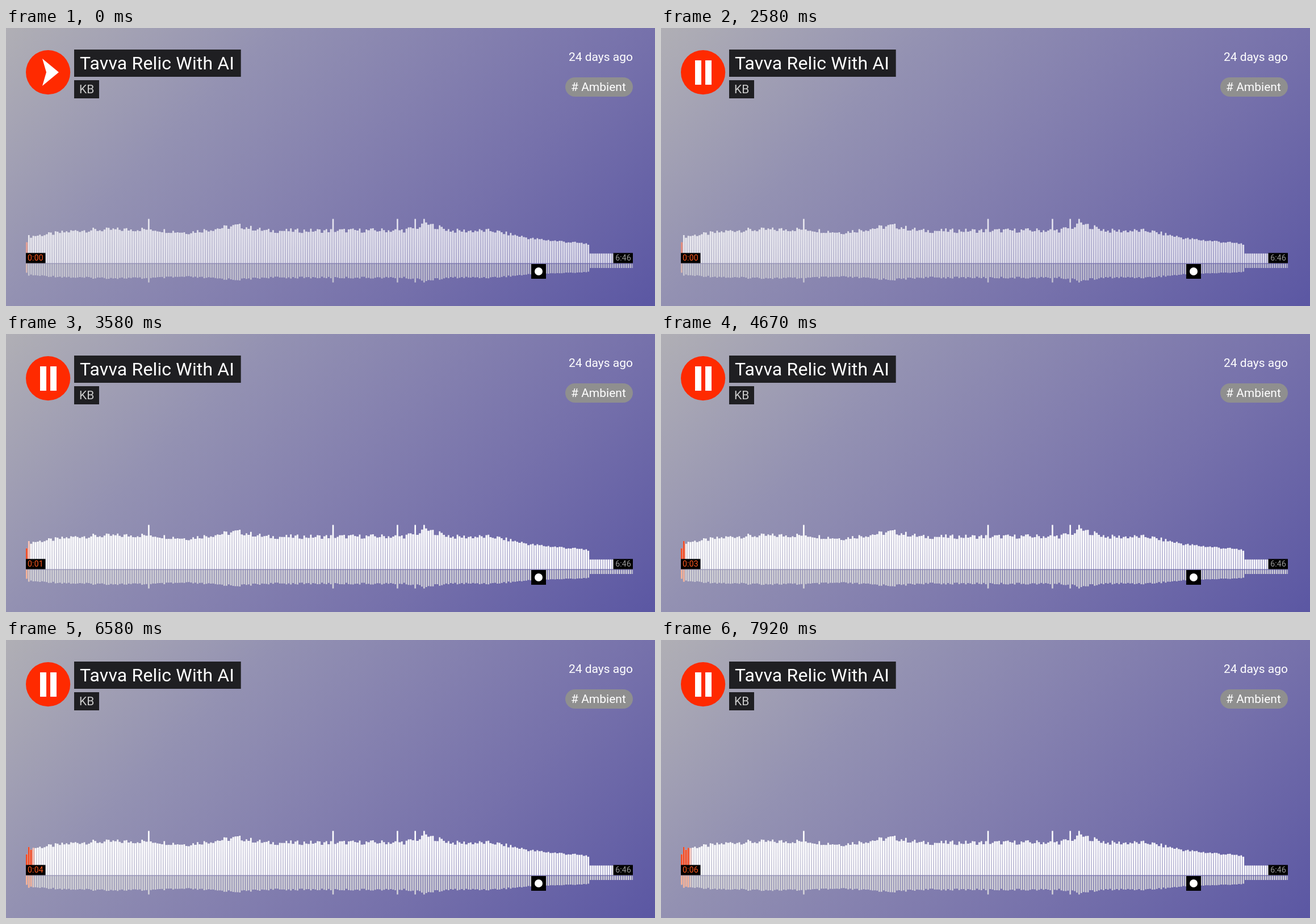
Animation of 1143 by 490 pixels, one loop 8000 ms. Source, as an HTML page:

```html
<!DOCTYPE html>
<html lang="en">
<head>
<meta charset="utf-8">
<title>Audio player</title>
<style>
html, body { margin: 0; width: 100%; height: 100%; overflow: hidden; }
body { background: linear-gradient(135deg, #b0afb5, #9391b2 30%, #8581af 50%, #7671ab 70%, #5b57a3); }
svg { display: block; font-family: Roboto, Inter, sans-serif; fill: #fff; }
.end { text-anchor: end; }
.small { font-size: 14px; letter-spacing: .2px; }
</style>
</head>
<body>
<svg width="1143" height="490" viewBox="0 0 1143 490">
  <defs>
    <linearGradient id="fade" gradientUnits="userSpaceOnUse" x1="0" y1="345" x2="0" y2="414">
      <stop stop-color="#fff" stop-opacity=".7"/>
      <stop offset="1" stop-color="#fff" stop-opacity=".4"/>
    </linearGradient>
  </defs>

  <circle cx="74.1" cy="78.1" r="39.1" fill="#ff2a00"/>
  <path id="icon"/>

  <path d="M120 38h293.7v48H120z" fill="#1f1f22"/>
  <text x="130" y="73" font-size="32" letter-spacing=".15">Tavva Relic With AI</text>
  <path d="M120 92h44v32h-44z" fill="#1f1f22"/>
  <text x="129" y="115" font-size="21" fill="#ccc">KB</text>

  <text class="end" x="1104" y="58" font-size="21">24 days ago</text>
  <rect x="985" y="87" width="119" height="34" rx="17" fill="#8f8f8f"/>
  <text x="995" y="111" font-size="21">#&#160;Ambient</text>

  <g id="wave">
    <path id="gaps" fill="url(#fade)"/>
    <path id="upper"/>
    <path id="lower" fill="#dcdcdc" opacity=".9"/>
    <g id="played"></g>
  </g>

  <path d="M35 396.5h34.5v18H35zM1069.5 396.5h34.5v18h-34.5z" fill="#000"/>
  <text id="clock" class="small" x="38" y="410" fill="#ff5a1f"></text>
  <text class="small end" x="1101" y="410" fill="#999">6:46</text>

  <path d="M925 416h26v26h-26z" fill="#000"/>
  <circle cx="938" cy="429" r="7"/>
</svg>
<script>
const LOOP = 8000, TRACK = 406, BARS = 274;
const LEFT = 35, RIGHT = 1104, BASE = 414.5, MIRROR = 415.8;
const UNIT = (RIGHT - LEFT) / 820, PITCH = 3 * UNIT, WIDTH = 2 * UNIT;
const PLAY = 'M64 54L93 78L64 102L71 78z';
const PAUSE = 'M60 57h11v43H60zM78 57h11v43H78z';
const $ = id => document.getElementById(id);
const clamp = v => Math.min(1, Math.max(0, v));

// Loudness curve as [bar, height], with a few loud beats on top
const curve = [[0, 39], [1, 47], [24, 58], [55, 60], [72, 54], [95, 66], [108, 57], [170, 58],
  [181, 68], [192, 57], [210, 57], [228, 43], [253, 34], [254, 17], [BARS, 17]];
const beats = [55, 138, 167, 175, 179];

function random(seed) {
  const v = Math.sin(seed * 12.9898) * 43758.5453;
  return v - Math.floor(v);
}

function barHeight(i) {
  if (beats.includes(i)) return 78;
  const k = curve.findIndex(([bar]) => bar > i);
  const [x0, y0] = curve[k - 1], [x1, y1] = curve[k];
  const level = y0 + (y1 - y0) * (i - x0) / (x1 - x0);
  return level + (random(i) - .5) * (level - 17) * .2;
}

const heights = Array.from({ length: BARS }, (_, i) => barHeight(i));
const barX = i => LEFT + i * PITCH;
const rect = (x, y, w, h) => {
  const width = Math.min(w, RIGHT - x);
  return width > 0 ? `M${x} ${y}h${width}v${h}h${-width}z` : '';
};
const upperBar = i => rect(barX(i), BASE - heights[i], WIDTH, heights[i]);
const lowerBar = i => rect(barX(i), MIRROR, WIDTH, heights[i] * .42);
const gap = i => {
  const h = Math.min(heights[i], heights[i + 1] ?? 0);
  return rect(barX(i) + WIDTH, BASE - h, PITCH - WIDTH, h);
};
const join = shape => heights.map((_, i) => shape(i)).join('');

$('upper').setAttribute('d', join(upperBar));
$('lower').setAttribute('d', join(lowerBar));
$('gaps').setAttribute('d', join(gap));
$('played').innerHTML = [0, 1, 2, 3, 4].map(i => `<g>
  <path d="${upperBar(i)}" fill="#f5481f"/>
  <path d="${gap(i)}" fill="#f5481f" opacity=".5"/>
  <path d="${lowerBar(i)}" fill="#f7b095"/></g>`).join('');

function draw(now) {
  const t = now % LOOP;
  const seconds = Math.max(.75, (t - 1625) / 1000);
  const position = seconds / TRACK * BARS;
  $('icon').setAttribute('d', t < 2500 ? PLAY : PAUSE);
  $('clock').textContent = '0:0' + Math.floor(seconds);
  $('wave').setAttribute('opacity', .8 + .2 * clamp((t - 2580) / 250));
  [...$('played').children].forEach((bar, i) => bar.setAttribute('opacity', clamp(position - i)));
}

const start = performance.now();
function tick() {
  draw(performance.now() - start);
  requestAnimationFrame(tick);
}
tick();
</script>
</body>
</html>
```
